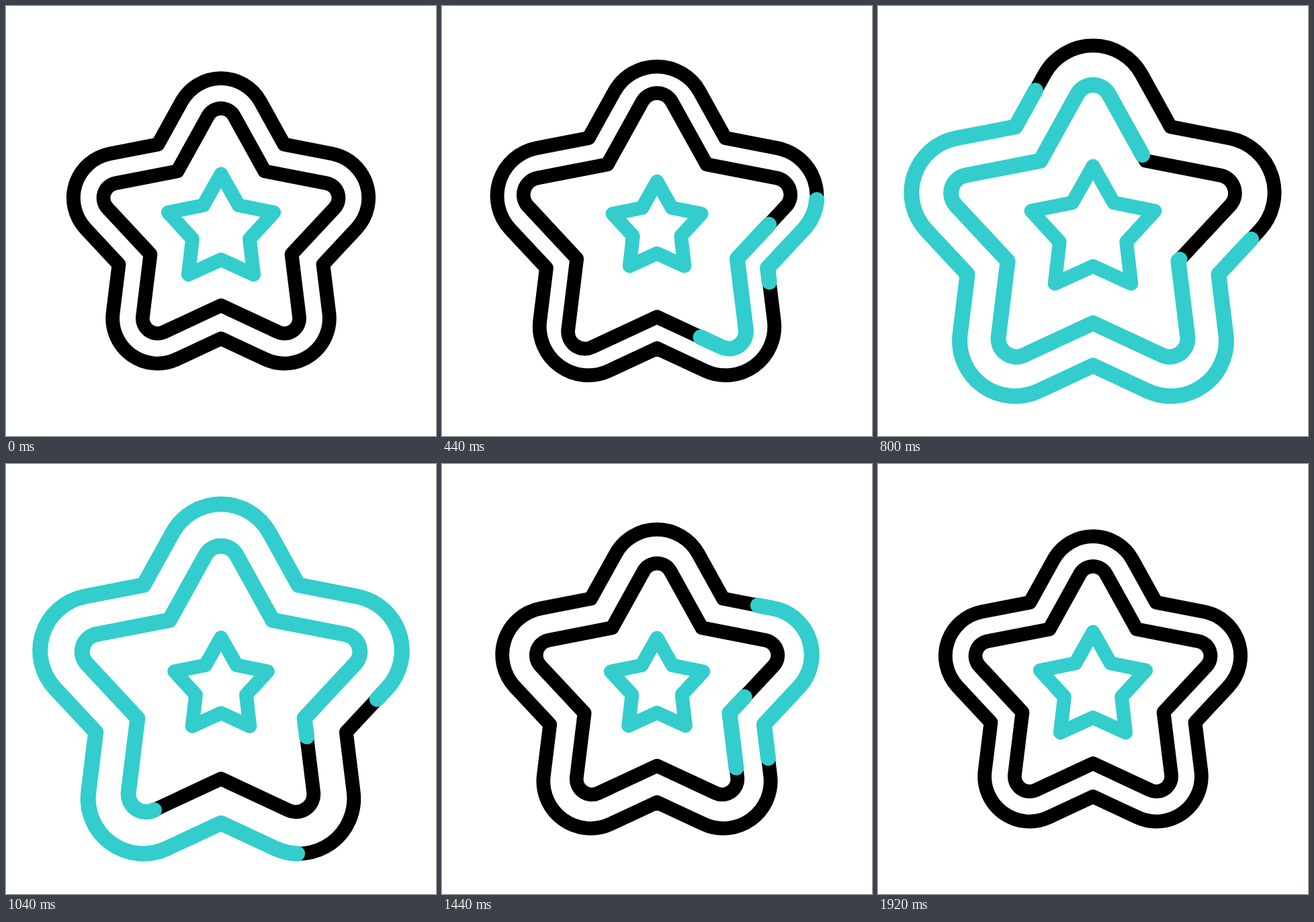
Recreate the animation shown at these times as an HTML page. Size 640 px wide and 640 px high, loop 2.24 s.

```html
<!DOCTYPE html>
<html lang="en">
<head>
<meta charset="utf-8">
<title>Pulsing star</title>
<style>
  html, body { margin: 0; width: 100%; height: 100%; overflow: hidden; background: #fff; }
  svg { display: block; width: 100vw; height: 100vh; }
  path { fill: none; stroke-linecap: round; stroke-linejoin: round; }
</style>
</head>
<body>
<svg viewBox="0 0 640 640"><g id="stage" transform="translate(320 320)"></g></svg>
<script>
const TICK = 40, LOOP = 2240;
const BLACK = '#000', TEAL = '#33cdcd';
const RAD = Math.PI / 180;
const HALF_TIP = 29;          // half the angle of an arm's tip
const ARM_DISTANCE = 160.5;   // star centre to the centre of an arm's round end

const stage = document.getElementById('stage');

function point(radius, degrees, cx, cy) {
  const x = cx + radius * Math.cos(degrees * RAD);
  const y = cy + radius * Math.sin(degrees * RAD);
  return x.toFixed(3) + ' ' + y.toFixed(3);
}

// Rounded star, clockwise, starting where the right arm's arc ends.
function roundStar(radius, cy) {
  const sweep = 90 - HALF_TIP;
  const notch = (radius + ARM_DISTANCE * Math.sin(HALF_TIP * RAD)) / Math.cos((sweep - 36) * RAD);
  const onArc = (axis, turn) => point(radius, axis + turn,
    ARM_DISTANCE * Math.cos(axis * RAD), cy + ARM_DISTANCE * Math.sin(axis * RAD));
  let d = 'M' + onArc(-18, sweep);
  for (let i = 0; i < 5; i++) {
    const axis = -18 + 72 * i;
    d += 'L' + point(notch, axis + 36, 0, cy) + 'L' + onArc(axis + 72, -sweep) +
      `A${radius} ${radius} 0 0 1 ` + onArc(axis + 72, sweep);
  }
  return d + 'Z';
}

function sharpStar(tip, notch, cy) {
  const corners = [];
  for (let i = 0; i < 10; i++) corners.push(point(i % 2 ? notch : tip, -90 + 36 * i, 0, cy));
  return 'M' + corners.join('L') + 'Z';
}

function addPath(d, color) {
  const path = document.createElementNS('http://www.w3.org/2000/svg', 'path');
  path.setAttribute('d', d);
  path.setAttribute('stroke', color);
  path.setAttribute('pathLength', 100);
  stage.appendChild(path);
  return path;
}

function setScale(path, scale, width) {
  path.setAttribute('transform', `scale(${scale})`);
  path.setAttribute('stroke-width', width / scale);
}

const progress = (k, from, to) => Math.min(1, Math.max(0, (k - from) / (to - from)));
const smooth = u => u * u * (3 - 2 * u);

// cubic-bezier(.33, 0, .2, 1)
function swift(x) {
  let low = 0, high = 1;
  for (let i = 0; i < 24; i++) {
    const s = (low + high) / 2, r = 1 - s;
    if (s * (r * r * 0.99 + r * s * 0.6 + s * s) < x) low = s; else high = s;
  }
  return smooth((low + high) / 2);
}

function keyed(keys, k) {
  if (k <= keys[0][0]) return keys[0][1];
  for (let i = 1; i < keys.length; i++) {
    const [from, a] = keys[i - 1], [to, b] = keys[i];
    if (k <= to) return a + (b - a) * smooth(progress(k, from, to));
  }
  return keys[keys.length - 1][1];
}

function makeRing(radius, delay, grow, origin, drift) {
  const d = roundStar(radius, 15.2);
  return { base: addPath(d, BLACK), trace: addPath(d, TEAL), delay, grow, origin, drift };
}

function drawRing(ring, tick) {
  const k = tick - ring.delay;
  const scale = 1 + ring.grow * (swift(progress(k, 0, 15)) - swift(progress(k, 17, 41)));
  setScale(ring.base, scale, 20.8);
  setScale(ring.trace, scale, 23);

  const tail = smooth(progress(k, 14, 35));
  const length = 100 * (smooth(progress(k, 0, 21)) - tail);
  const start = 100 * (ring.origin + ring.drift * k + tail);
  ring.trace.style.display = length > 0.01 ? '' : 'none';
  ring.trace.setAttribute('stroke-dasharray',
    length > 99.99 ? 'none' : `${length} ${100 - length}`);
  ring.trace.setAttribute('stroke-dashoffset', -(start % 100));
}

const rings = [
  makeRing(67, 7, 0.232, -0.0495, 0.0046),
  makeRing(22.3, 5, 0.208, -0.001, 0.0048)
];
const core = addPath(sharpStar(82.8, 44.7, 12.8), TEAL);
const PULSE = [[5, 1], [9.5, 0.8], [18, 1.27], [24.5, 0.82], [31, 1.27], [37.5, 0.81], [45, 1]];

function draw(time) {
  const tick = Math.floor((time % LOOP) / TICK);
  rings.forEach(ring => drawRing(ring, tick));
  setScale(core, keyed(PULSE, tick), 20.8);
}

const began = performance.now();
function loop() {
  draw(performance.now() - began);
  requestAnimationFrame(loop);
}
loop();
</script>
</body>
</html>
```
